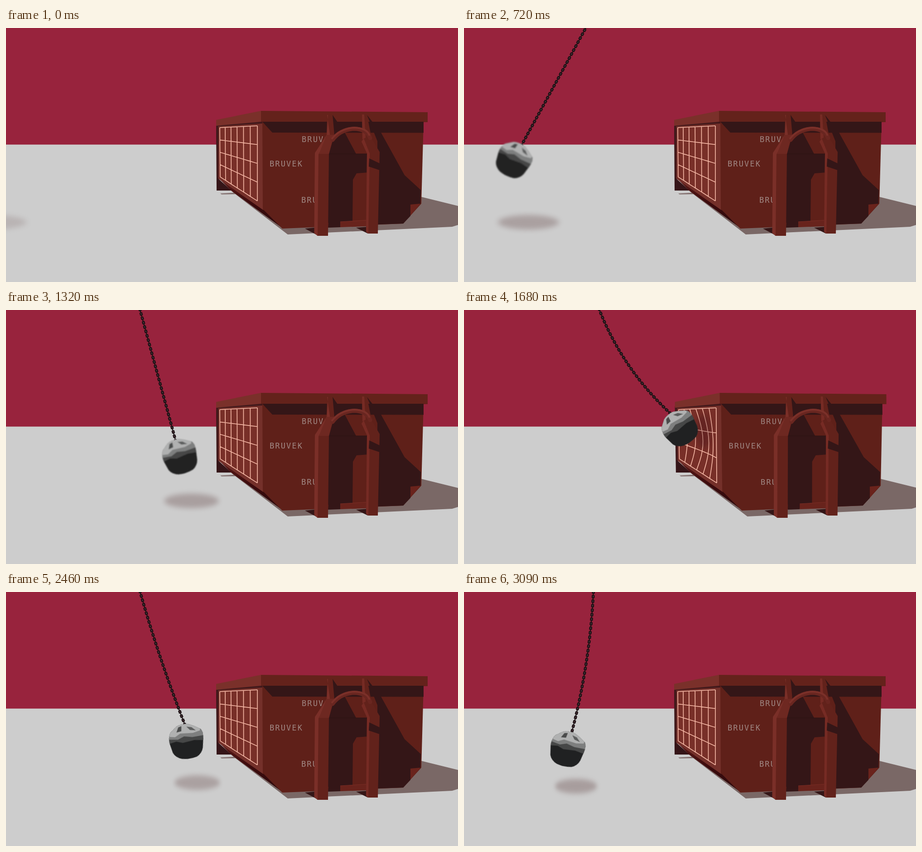
An HTML page for the animation above (3120 ms loop, 998 by 561 pixels).

```html
<!DOCTYPE html>
<html lang="en">
<head>
<meta charset="utf-8">
<title>Wrecking ball</title>
<style>
  html, body { margin: 0; width: 100%; height: 100%; overflow: hidden; background: #cdcdcd; }
  svg { display: block; width: 998px; height: 561px; }
  text { font: 17px "DejaVu Sans Mono", "Noto Sans Mono", monospace; letter-spacing: 2.1px; fill: url(#dots); }
</style>
</head>
<body>
<svg viewBox="0 0 998 561" xmlns="http://www.w3.org/2000/svg">
  <defs>
    <pattern id="dots" width="2" height="2" patternUnits="userSpaceOnUse">
      <rect width="2" height="2" fill="#8d706c"/>
      <rect width="1.2" height="1.2" fill="#c0aeaa"/>
    </pattern>
    <linearGradient id="skirt" x1="0" y1="0" x2="1" y2="1">
      <stop offset="0" stop-color="#5a1a18"/>
      <stop offset=".5" stop-color="#3c0b0d"/>
      <stop offset="1" stop-color="#2c0a0c"/>
    </linearGradient>
    <filter id="soft" x="-30%" y="-80%" width="160%" height="260%"><feGaussianBlur stdDeviation="6"/></filter>
    <filter id="ballBlur" x="-20%" y="-20%" width="140%" height="140%"><feGaussianBlur stdDeviation="0"/></filter>
    <filter id="chainBlur" filterUnits="userSpaceOnUse" x="-100" y="-100" width="700" height="500"><feGaussianBlur stdDeviation="0"/></filter>
    <clipPath id="sideClip"><path d="M468 215L567 211L568 401L469 333Z"/></clipPath>
    <clipPath id="textClip"><rect x="560" y="230" width="144" height="180"/></clipPath>
    <clipPath id="ballClip"><use href="#hull"/></clipPath>
  </defs>

  <rect width="998" height="561" fill="#cdcdcd"/>
  <rect width="998" height="257.5" fill="#98233d"/>
  <ellipse id="shade" rx="64" ry="16" fill="#84706f" filter="url(#soft)"/>

  <g id="box">
    <!-- shadow on the floor -->
    <path d="M905 370L998 393V435L985 439L622 456L500 362Z" fill="#7a6866"/>
    <path d="M473 365.500L503 364L508 367L476 367.500Z" fill="#7f6b6a"/>

    <!-- long side -->
    <path d="M464 212L470 214V334L498 359L465 359Z" fill="#351518"/>
    <path d="M469 331L568 398L612 443L498 360Z" fill="url(#skirt)"/>
    <path d="M468 215L567 209L568 402L469 333Z" fill="#74302a"/>
    <path d="M472 220L555 216V382L473 329Z" fill="#782f28"/>
    <path d="M464 214L566 206V211L469 217V333L466 331Z" fill="#42191b"/>
    <path d="M464 203L563 183V207L464 216Z" fill="#7a302a"/>
    <path id="grid" fill="none" stroke="#f3b5a3" stroke-width="1.7"/>
    <g clip-path="url(#sideClip)"><ellipse id="smear" rx="17" ry="38" fill="#3a1013" filter="url(#soft)"/></g>

    <!-- front -->
    <path d="M566 206L922 207L917 388L877 432L610 443L567 400Z" fill="#5f2019"/>
    <path d="M563 183L931 186V208L563 207Z" fill="#64221b"/>
    <path d="M566 207H922V231.500L588 231Z" fill="#341617"/>
    <g clip-path="url(#textClip)">
      <text x="653" y="252">BRUVEK</text>
      <text x="582" y="306">BRUVEK</text>
      <text x="652" y="386">BRUVEK</text>
    </g>
    <g fill="#341617">
      <path d="M721 192L748 231L773 278H800V319L774 321L766 335L765 428L711 430V240Z"/>
      <path d="M797 192L828 231L880 325L916 358L915 389L893 390V415L877 432L820 434V250Z"/>
      <path d="M660 443L690 440V459Z"/>
      <path d="M773 441L799 439V454Z"/>
      <path d="M712 429L738 428V440L711 441Z"/>
    </g>
    <path d="M893 390L915 388L893 414Z" fill="#6a231c"/>
    <path d="M713 278H800" stroke="#2b1213" fill="none"/>
    <path d="M738 428L797 424.500V438L738 440Z" fill="#68231c"/>
    <path d="M738 428L797 424.500" stroke="#7a2d25" fill="none"/>

    <!-- lifting arms -->
    <path d="M709 191H721L725 236L713 278L711 459H688L681 453L682 276L708 236Z" fill="#63221b"/>
    <path d="M682 276L708 236L711 192H709L715 235L690 279L688 459L680.500 453Z" fill="#7a2f28"/>
    <path d="M708 236H724L713 278H691Z" fill="#6e2821"/>
    <path d="M786 191H797L807 243L825 274L821 454H800L795 450L797 277L785 251L787 240Z" fill="#62221b"/>
    <path d="M785 251L790 244L803 277L800 454L795 450L797 277Z" fill="#762b24"/>
    <path d="M786 191H791L794 242L787 246Z" fill="#762b24"/>
    <path d="M802 288L825 299V314L801 306Z" fill="#341617"/>
    <g fill="none" stroke-linecap="round">
      <path d="M721 247Q738 224 769 222.500Q798 224 804 243" stroke="#692620" stroke-width="9"/>
      <path d="M720 244Q738 222 769 220Q796 221 802 236" stroke="#7b3029" stroke-width="4"/>
    </g>
  </g>

  <g id="chain" fill="none" filter="url(#chainBlur)">
    <path stroke="#1b1114" stroke-width="2.4"/>
    <path stroke="#1b1114" stroke-width="6.400" stroke-dasharray="6.500 3.500"/>
    <path stroke="#64404a" stroke-width="1.500" stroke-dasharray="3 7" stroke-dashoffset="-1.700"/>
  </g>

  <g id="ball" filter="url(#ballBlur)">
    <path id="hull" d="M-19 -35Q-8 -40 6 -39L20 -33L34 -25Q39 -18 38 -6L35 16Q32 29 20 35Q4 40 -13 37Q-27 33 -32 22L-37 2Q-39 -14 -33 -23Z" fill="#202122"/>
    <g clip-path="url(#ballClip)">
      <path d="M-40 -45H40V0L18 -2L-8 2L-22 -2L-40 2Z" fill="#464747"/>
      <path d="M-40 -45H40V-11L14 -9L-4 -12L-18 -6L-40 -8Z" fill="#7e7f7f"/>
      <path d="M-40 -45H34L32 -22L16 -18L-12 -19L-24 -12L-38 -14Z" fill="#b0b1b1"/>
      <path d="M-20 -22L-15 -33L-8 -35L-9 -24Z" fill="#4a4b4b"/>
      <path d="M3 -33L14 -31L23 -23L10 -25Z" fill="#5c5d5d"/>
    </g>
  </g>
</svg>
<script>
const LOOP = 3120, STEP = 30, HIT = 1620, LEAVE = 1800, END = 3090;
const PIVOT = [287, -33], RAD = Math.PI / 180;
const $ = id => document.getElementById(id);
const setBlur = (id, r) => $(id).firstElementChild.setAttribute("stdDeviation", r);

const clamp = v => Math.min(1, Math.max(0, v));
const ease = v => { const u = clamp(v); return u * u * (3 - 2 * u); };
const leaving = t => clamp((t - LEAVE) / (END - LEAVE));

// Swing in degrees: a slowing arc until the hit, a rest on the wall, then a growing fall back.
function swingAt(t) {
  const p = Math.min(t / HIT, 1);
  return -97 + 129.8 * p * (1.33 - .33 * p) - 41.7 * leaving(t) ** 1.45;
}

function poseAt(t) {
  const back = leaving(t), press = ease((t - 1350) / 270);
  const swing = swingAt(t);
  const reach = 370 - 20 * press + 35 * ease(back * 1.5);
  return {
    x: PIVOT[0] + reach * Math.sin(swing * RAD),
    y: PIVOT[1] + reach * Math.cos(swing * RAD),
    spin: -swing + 17 * ease((t - 1650) / 250) * (1 - .6 * back),
    bow: 20 * press - 30 * back,
    speed: Math.abs(swingAt(t + 15) - swingAt(t - 15)),
    dent: ease((t - HIT) / 50) * (1 - ease((t - 1710) / 200))
  };
}

function gridPath(dent) {
  const rows = dent > .05 ? 3 : 4;
  const point = (u, v) => {
    const push = dent * Math.sin(Math.PI * u) * Math.sin(Math.PI * v);
    const x = 472 + 83 * u + v * (1 - u) + 15 * push;
    const y = (220 - 4 * u) * (1 - v) + (329 + 53 * u) * v + 4 * push;
    return x.toFixed(1) + " " + y.toFixed(1);
  };
  const line = at => "M" + Array.from({ length: 13 }, (_, i) => at(i / 12)).join("L");
  let d = "";
  for (let c = 0; c <= 6; c++) {
    const s = c / 6, u = s * (.84 + .16 * s);
    d += line(v => point(u, v));
  }
  for (let r = 0; r <= rows; r++) d += line(u => point(u, r / rows));
  return d;
}

function chainPath(x, y, bow) {
  const [px, py] = PIVOT, dx = x - px, dy = y - py, len = Math.hypot(dx, dy);
  const cx = px + dx / 2 - 2 * bow * dy / len;
  const cy = py + dy / 2 + 2 * bow * dx / len;
  return `M${px} ${py}Q${cx} ${cy} ${x} ${y}`;
}

function draw(t) {
  const { x, y, spin, bow, speed, dent } = poseAt(t);

  $("ball").setAttribute("transform", `translate(${x} ${y}) rotate(${spin})`);
  setBlur("ballBlur", .2 + .55 * speed);
  setBlur("chainBlur", .25 * speed);
  const d = chainPath(x + 38 * Math.sin(spin * RAD), y - 38 * Math.cos(spin * RAD), bow);
  for (const link of $("chain").children) link.setAttribute("d", d);

  // The floor shadow leans away from the light and fades where the wall catches it.
  const height = 430 - y, shadeX = x + Math.min(50, .24 * height);
  const shadeY = 429 - Math.max(0, shadeX - 245) * .045;
  $("shade").setAttribute("transform", `translate(${shadeX} ${shadeY}) scale(${.6 + .18 * speed} 1)`);
  $("shade").setAttribute("opacity", (.55 - height / 1800) * clamp((455 - x) / 60));

  $("smear").setAttribute("transform", `translate(${x + 50} 268)`);
  $("smear").setAttribute("opacity", .5 * clamp((x - 430) / 40) * (1 - .4 * dent));

  $("grid").setAttribute("d", gridPath(dent));
  $("box").setAttribute("transform", `matrix(1 0 ${.008 * dent} 1 0 0)`);
}

const start = performance.now();
function tick() {
  const t = (performance.now() - start) % LOOP;
  draw(Math.floor(t / STEP) * STEP);
  requestAnimationFrame(tick);
}
tick();
</script>
</body>
</html>
```
